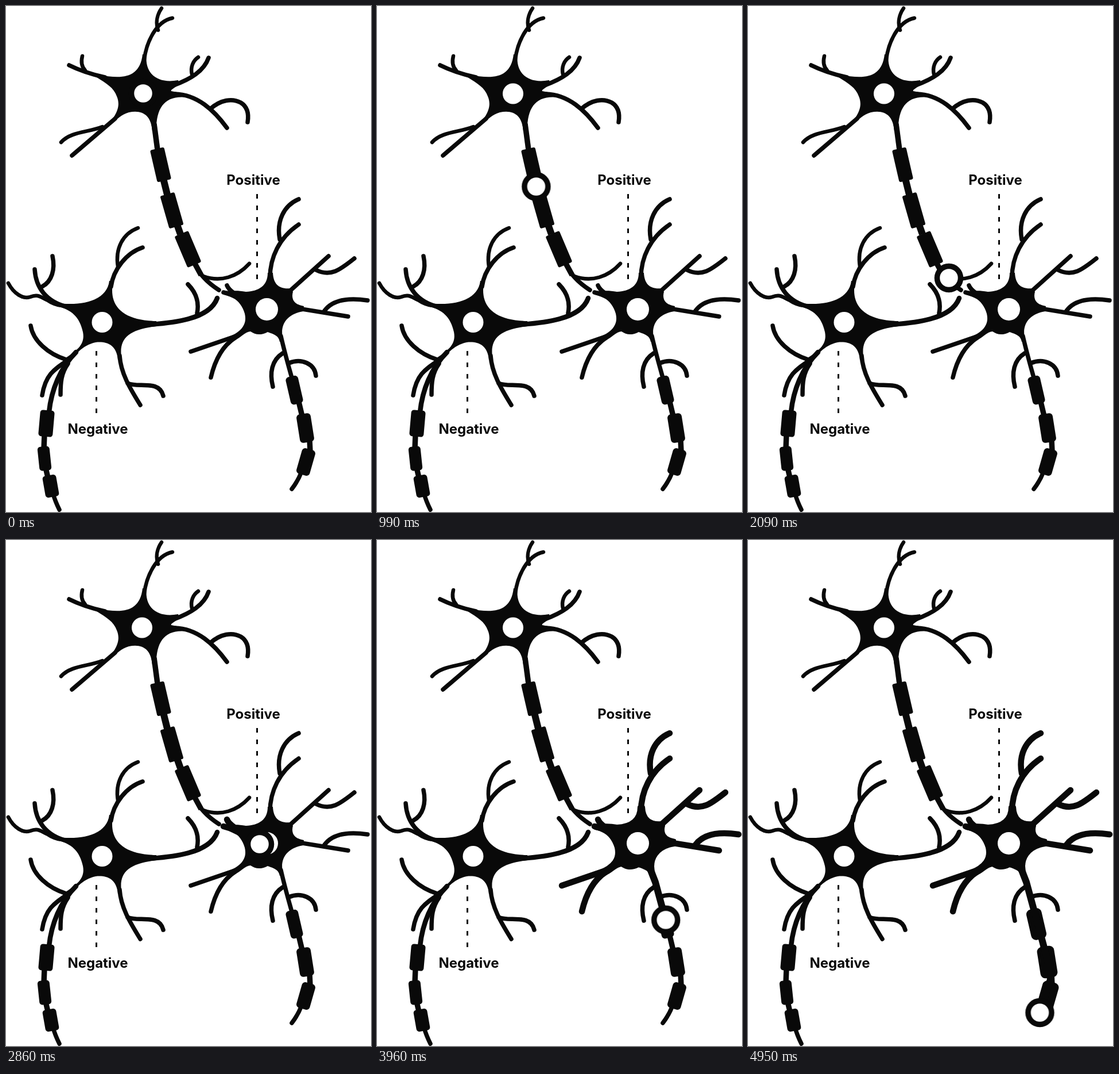
An HTML page for the animation above (5.06 s loop, 636 by 880 pixels).

```html
<!DOCTYPE html>
<html lang="en">
<head>
<meta charset="utf-8">
<title>Neuron signal</title>
<style>
html, body { margin: 0; width: 100%; height: 100%; overflow: hidden; background: #fff; }
svg { display: block; width: 636px; height: 880px; }
.ink { fill: #090909; }
.line { fill: none; stroke: #090909; stroke-width: 7.5; stroke-linecap: round; stroke-linejoin: round; }
.thin { stroke-width: 6.5; }
.wide { stroke-width: 8.5; }
.cut { stroke-linecap: butt; stroke-width: 9.5; }
.dash { fill: none; stroke: #090909; stroke-width: 3; stroke-dasharray: 8 12; }
.hole { fill: #fff; }
text { font: 700 24px Inter, "Open Sans", sans-serif; text-anchor: middle; fill: #090909; }

.ball, .grow, .swell {
  animation: 5060ms linear -1ms infinite;
}
.ball { fill: #fff; stroke: #090909; stroke-width: 9.5; animation-name: travel; }
.grow { stroke-width: 10.5; stroke-dasharray: 1 2; stroke-dashoffset: 1.01; }
.entry { animation-name: entry; }
.upper { animation-name: upper; }
.side { animation-name: side; }
.axon { stroke-width: 12; animation-name: axon; }
.swell { stroke: #090909; stroke-width: 0; stroke-linejoin: round; }
.s0 { animation-name: swell0; }
.s1 { animation-name: swell1; }
.s2 { animation-name: swell2; }
.s3 { animation-name: swell3; }

/* the loop is 46 ticks of 110 ms; each leg steps once per tick */
@keyframes travel {
  0% { transform: translate(239px, 152px); animation-timing-function: steps(5); }
  10.869% { transform: translate(263px, 246px); animation-timing-function: steps(5); }
  21.739% { transform: translate(281px, 331px); animation-timing-function: steps(5); }
  32.608% { transform: translate(313px, 421px); animation-timing-function: steps(4); }
  41.304% { transform: translate(350px, 473px); animation-timing-function: steps(1); }
  43.478% { transform: translate(363px, 484px); animation-timing-function: steps(5); }
  54.347% { transform: translate(427px, 518px); animation-timing-function: steps(1); }
  56.521% { transform: translate(442px, 529px); animation-timing-function: steps(6); }
  69.565% { transform: translate(485px, 595px); animation-timing-function: steps(8); }
  86.956% { transform: translate(521.5px, 726.5px); animation-timing-function: steps(2); }
  91.304% { transform: translate(527px, 764px); animation-timing-function: steps(3); }
  97.826%, 100% { transform: translate(508.5px, 822px); }
}
@keyframes entry {
  0%, 43.478% { stroke-dashoffset: 1.01; animation-timing-function: steps(4); }
  52.173%, 100% { stroke-dashoffset: 0; }
}
@keyframes upper {
  0%, 56.521% { stroke-dashoffset: 1.01; animation-timing-function: steps(4); }
  65.217%, 100% { stroke-dashoffset: 0; }
}
@keyframes side {
  0%, 56.521% { stroke-dashoffset: 1.01; animation-timing-function: steps(6); }
  69.565%, 100% { stroke-dashoffset: 0; }
}
@keyframes axon {
  0%, 67.391% { stroke-dashoffset: 1.01; animation-timing-function: steps(1); }
  69.565% { stroke-dashoffset: .905; animation-timing-function: steps(8); }
  86.956% { stroke-dashoffset: .376; animation-timing-function: steps(2); }
  91.304% { stroke-dashoffset: .231; animation-timing-function: steps(3); }
  97.826%, 100% { stroke-dashoffset: 0; }
}
@keyframes swell0 {
  0% { stroke-width: 0; animation-timing-function: step-end; }
  60.869%, 100% { stroke-width: 4px; }
}
@keyframes swell1 {
  0% { stroke-width: 0; animation-timing-function: step-end; }
  80.434%, 100% { stroke-width: 5px; }
}
@keyframes swell2 {
  0% { stroke-width: 0; animation-timing-function: step-end; }
  86.956%, 100% { stroke-width: 5px; }
}
@keyframes swell3 {
  0% { stroke-width: 0; animation-timing-function: step-end; }
  95.652%, 100% { stroke-width: 5px; }
}
</style>
</head>
<body>
<svg viewBox="0 0 636 880">
  <!-- sending cell -->
  <path class="ink" d="M160 119C202 128 233 126 238 84L245 84C241 116 262 136 300 129L302 136C293 143 286 146 288 148L314 153L314 159C276 155 261 178 262 218L255 218C253 190 238 180 214 185C200 189 194 197 184 205L172 212C197 187 199 171 193 157C188 142 174 134 158 124Z"/>
  <g class="line">
    <path class="thin" d="M241 93C244 66 260 27 290 21"/>
    <path class="thin" d="M265 42C260 28 264 14 271 4"/>
    <path d="M110 103C130 113 150 119 172 124"/>
    <path class="thin" d="M138 112C131 105 131 95 133 87"/>
    <path d="M353 90C345 113 322 127 292 138"/>
    <path class="thin" d="M324 119C321 106 326 95 335 89"/>
    <path d="M294 153C334 154 363 182 385 212"/>
    <path d="M356 179C374 163 394 160 409 168C422 176 423 190 421 202"/>
    <path d="M115 260L190 196"/>
    <path class="thin" d="M96 237C113 218 144 220 168 210"/>
    <path class="thin" d="M344 470C374 481 403 471 424 448"/>
    <path d="M330 450C338 469 354 483 371 494"/>
  </g>
  <g class="line cut">
    <path d="M258 205L264 250"/>
    <path style="stroke-width:12" d="M274 300L281 328M298 380L304 397"/>
    <path d="M328 446L340 468"/>
  </g>
  <g class="ink">
    <rect x="-12.5" y="-28.5" width="25" height="57" rx="3" transform="translate(269.500 276) rotate(-13)"/>
    <rect x="-13" y="-29.500" width="26" height="59" rx="3" transform="translate(289 355.500) rotate(-16)"/>
    <rect x="-13" y="-29.500" width="26" height="59" rx="3" transform="translate(317 423) rotate(-23)"/>
  </g>

  <!-- inhibited cell -->
  <path class="ink" d="M84 516C131 523 176 513 180 478L187 478C178 518 199 547 262 548L262 557C211 563 195 580 202 616L195 616C193 588 174 583 156 585C133 590 118 607 104 632L97 626L104 612C126 598 138 587 134 567C128 540 114 528 88 522Z"/>
  <g class="line">
    <path d="M183 488C187 458 210 429 238 420"/>
    <path class="thin" d="M195 453C190 422 203 396 230 386"/>
    <path d="M50 458C52 491 71 513 102 522"/>
    <path d="M63 488C80 479 86 458 81 435"/>
    <path class="thin" d="M4 482C14 501 30 510 42 506C57 500 61 507 73 512C80 517 88 520 98 521"/>
    <path class="wide" d="M235 555C291 552 355 545 368 508"/>
    <path d="M333 534C337 514 330 497 317 484"/>
    <path d="M198 608C200 640 218 668 234 694"/>
    <path d="M212 656C229 665 267 649 274 678"/>
    <path d="M43 556C47 582 73 605 105 615"/>
    <path d="M112 613C84 632 69 640 63 677"/>
    <path d="M108 622C96 639 95 655 95 676"/>
    <path class="wide" d="M122 602C94 630 79 668 75 706"/>
    <path d="M82 848C85 859 89 868 93 876"/>
  </g>
  <path class="line cut" d="M67 745L66 770M69 803L73 820"/>
  <g class="ink">
    <rect x="-12.500" y="-23" width="25" height="46" rx="5" transform="translate(70.500 726) rotate(5)"/>
    <rect x="-10.500" y="-21" width="21" height="42" rx="5" transform="translate(67 787) rotate(-6)"/>
    <rect x="-12" y="-19" width="24" height="38" rx="5" transform="translate(78 835) rotate(-10)"/>
  </g>

  <!-- excited cell -->
  <path class="ink swell s0" d="M378 495C390 497 399 493 418 497C440 496 456 487 456 464L465 464C466 484 476 493 496 491L500 497C497 508 500 519 519 522L518 531C491 535 474 554 484 584L477 584C475 573 467 571 456 567C442 574 434 571 426 566C415 567 410 577 397 582L385 577C413 566 420 552 416 535C410 515 397 505 380 502Z"/>
  <g class="line">
    <g id="entry">
      <path pathLength="1" d="M379 498C392 501 402 506 415 514"/>
      <path pathLength="1" d="M385 486C387 491 391 495 397 499"/>
    </g>
    <g id="upper">
      <path pathLength="1" d="M460 476C459 437 477 402 510 380"/>
      <path pathLength="1" d="M477 406C471 374 484 347 510 336"/>
      <path pathLength="1" d="M493 497L562 435"/>
      <path pathLength="1" d="M540 459C566 472 583 458 607 439"/>
    </g>
    <g id="side">
      <path pathLength="1" d="M503 525L596 540"/>
      <path pathLength="1" d="M555 530C571 508 603 508 630 512"/>
      <path pathLength="1" d="M404 573L322 601"/>
      <path pathLength="1" d="M399 577C376 592 364 616 357 646"/>
    </g>
    <path d="M482 604C463 616 459 638 465 662"/>
    <path d="M493 621C515 612 538 622 540 643"/>
    <path d="M479 574C485 601 492 625 499 650M514 812C510 823 504 832 498 840"/>
  </g>
  <path class="line cut" d="M510 688L516 713M529 754L530 775"/>
  <g class="ink">
    <rect class="swell s1" x="-11" y="-24.500" width="22" height="49" rx="6" transform="translate(502.500 668) rotate(-13)"/>
    <rect class="swell s2" x="-12.500" y="-25" width="25" height="50" rx="6" transform="translate(521.500 734) rotate(-9)"/>
    <rect class="swell s3" x="-12" y="-23" width="24" height="46" rx="6" transform="translate(522.500 793) rotate(16)"/>
  </g>
  <g class="line">
    <use href="#entry" class="grow entry"/>
    <use href="#upper" class="grow upper"/>
    <use href="#side" class="grow side"/>
    <path class="grow axon" pathLength="1" d="M476 572L485 595L503 661L521 727L527 764L509 821"/>
  </g>

  <g class="hole">
    <circle cx="237" cy="152.500" r="18"/>
    <circle cx="167.500" cy="550" r="18"/>
    <circle cx="454.500" cy="527.500" r="19.500"/>
  </g>

  <path class="dash" d="M437.500 327V475M157.500 600V708"/>
  <text x="431" y="311">Positive</text>
  <text x="160" y="744">Negative</text>

  <circle class="ball" r="20.500"/>
</svg>
</body>
</html>
```
